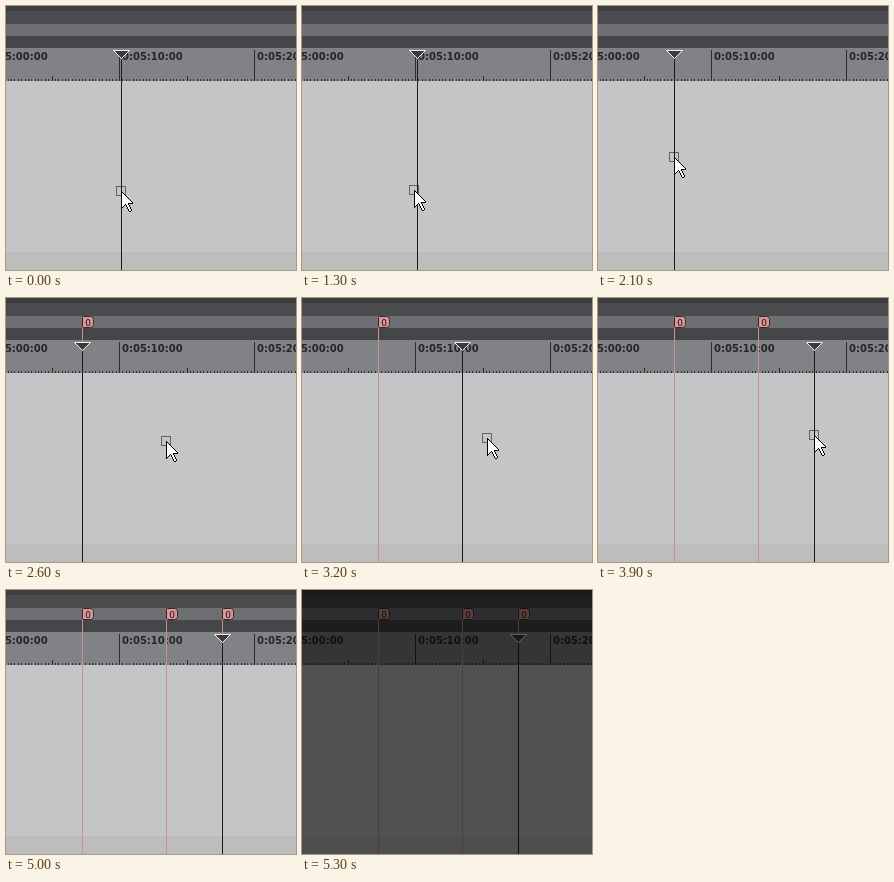
Write an HTML page with a canvas that moves like this. It is 290 px wide and 264 px high and loops after 5400 ms.

```html
<!DOCTYPE html>
<html lang="en">
<head>
<meta charset="utf-8">
<title>Timeline markers</title>
<style>
  html, body { margin: 0; width: 100%; height: 100%; overflow: hidden; background: #c4c5c7; }
  canvas { display: block; }
</style>
</head>
<body>
<canvas id="stage" width="290" height="264"></canvas>
<script>
const W = 290, H = 264, LOOP = 5400, FRAME = 100;
const MAJOR = 135, MINOR = 40;
const ctx = document.getElementById('stage').getContext('2d');

const home = { x: 115, y: 185 };
const moves = [
  { from: 1250, to: 1600, x: 66, y: 168 },
  { from: 1800, to: 2000, x: 76, y: 151 },
  { from: 2200, to: 2600, x: 160, y: 143 },
  { from: 2900, to: 3550, x: 216, y: 137 },
  { from: 3900, to: 4500, x: 262, y: 154 },
  { from: 4700, to: 5000, x: 63, y: 300 }
];

// A click moves the playhead; a marker is dropped there a little later.
const stops = [
  { x: 76, click: 2100, drop: 2300 },
  { x: 160, click: 3000, drop: 3300 },
  { x: 216, click: 3900, drop: 4200 }
];

function ease(p) {
  p = Math.min(1, Math.max(0, p));
  return p * p * (3 - 2 * p);
}

function pointerAt(t) {
  let { x, y } = home;
  for (const m of moves) {
    const p = ease((t - m.from) / (m.to - m.from));
    x += (m.x - x) * p;
    y += (m.y - y) * p;
  }
  return [Math.round(x), Math.round(y)];
}

function playheadAt(t) {
  return stops.reduce((x, s) => t >= s.click ? s.x : x, home.x);
}

function box(x, y, w, h, color) {
  ctx.fillStyle = color;
  ctx.fillRect(x, y, w, h);
}

function drawPanels() {
  box(0, 0, W, 5, '#3d3e40');
  box(0, 5, W, 13, '#4a4b4d');
  box(0, 18, W, 12, '#6e6f72');
  box(0, 30, W, 12, '#454648');
  box(0, 42, W, 33, '#818285');
  box(0, 75, W, 171, '#c4c5c7');
  box(0, 246, W, 18, '#bdbdbe');
}

function drawRuler() {
  const ink = '#2b2c2e';
  ctx.font = 'bold 10px "DejaVu Sans", sans-serif';
  ctx.textAlign = 'left';
  for (let i = 0; i < 3; i++) {
    const x = -22 + i * MAJOR;
    for (let k = 1; k < MINOR; k++) {
      const h = k === MINOR / 2 ? 5 : 2;
      box(Math.round(x + k * MAJOR / MINOR), 75 - h, 1, h, ink);
    }
    box(x, 44, 1, 31, ink);
    ctx.fillStyle = '#242527';
    ctx.fillText('0:05:' + i + '0:00', x + 3, 54);
  }
}

function drawMarker(x) {
  box(x, 29, 1, H - 29, '#d08e8e');
  ctx.beginPath();
  ctx.roundRect(x + 0.5, 18.5, 11, 11, [1, 3, 3, 1]);
  ctx.fillStyle = '#d99595';
  ctx.fill();
  ctx.lineWidth = 1;
  ctx.strokeStyle = '#3c2628';
  ctx.stroke();
  ctx.font = '9px "DejaVu Sans", sans-serif';
  ctx.textAlign = 'center';
  ctx.fillStyle = '#1e1416';
  ctx.fillText('0', x + 6, 27.5);
}

function drawPlayhead(x) {
  box(x, 53, 1, H - 53, '#1a1a1b');
  ctx.beginPath();
  ctx.moveTo(x - 7.5, 44.5);
  ctx.lineTo(x + 8.5, 44.5);
  ctx.lineTo(x + 0.5, 52.5);
  ctx.closePath();
  ctx.fillStyle = '#3a3b3d';
  ctx.fill();
  ctx.lineWidth = 1;
  ctx.strokeStyle = '#f0f0f0';
  ctx.stroke();
}

function drawPointer(x, y) {
  ctx.setLineDash([1, 1]);
  ctx.lineWidth = 1;
  ctx.strokeStyle = '#000';
  ctx.strokeRect(x - 4.5, y - 4.5, 9, 9);
  ctx.setLineDash([]);

  // One pixel row of the arrow: black ends, white between.
  const row = (dy, a, b) => {
    box(x + a, y + dy, b - a + 1, 1, '#000');
    if (b > a + 1) box(x + a + 1, y + dy, b - a - 1, 1, '#fff');
  };
  for (let i = 0; i < 12; i++) row(i, 0, i);
  row(12, 0, 7);
  box(x + 7, y + 12, 5, 1, '#000');
  for (let i = 13; i < 20; i++) {
    const left = 4 + Math.floor((i - 12) / 2);
    row(i, left, left + 3);
    if (i < 18) row(i, 0, 17 - i);
  }
  row(20, 8, 9);
}

function draw(t) {
  drawPanels();
  drawRuler();
  stops.filter(s => t >= s.drop).forEach(s => drawMarker(s.x));
  drawPlayhead(playheadAt(t));
  drawPointer(...pointerAt(t));
  if (t >= 5300) box(0, 0, W, H, 'rgba(0, 0, 0, 0.59)');
}

const start = performance.now();
function tick() {
  const t = (performance.now() - start) % LOOP;
  draw(Math.floor(t / FRAME) * FRAME);
  requestAnimationFrame(tick);
}
tick();
</script>
</body>
</html>
```
